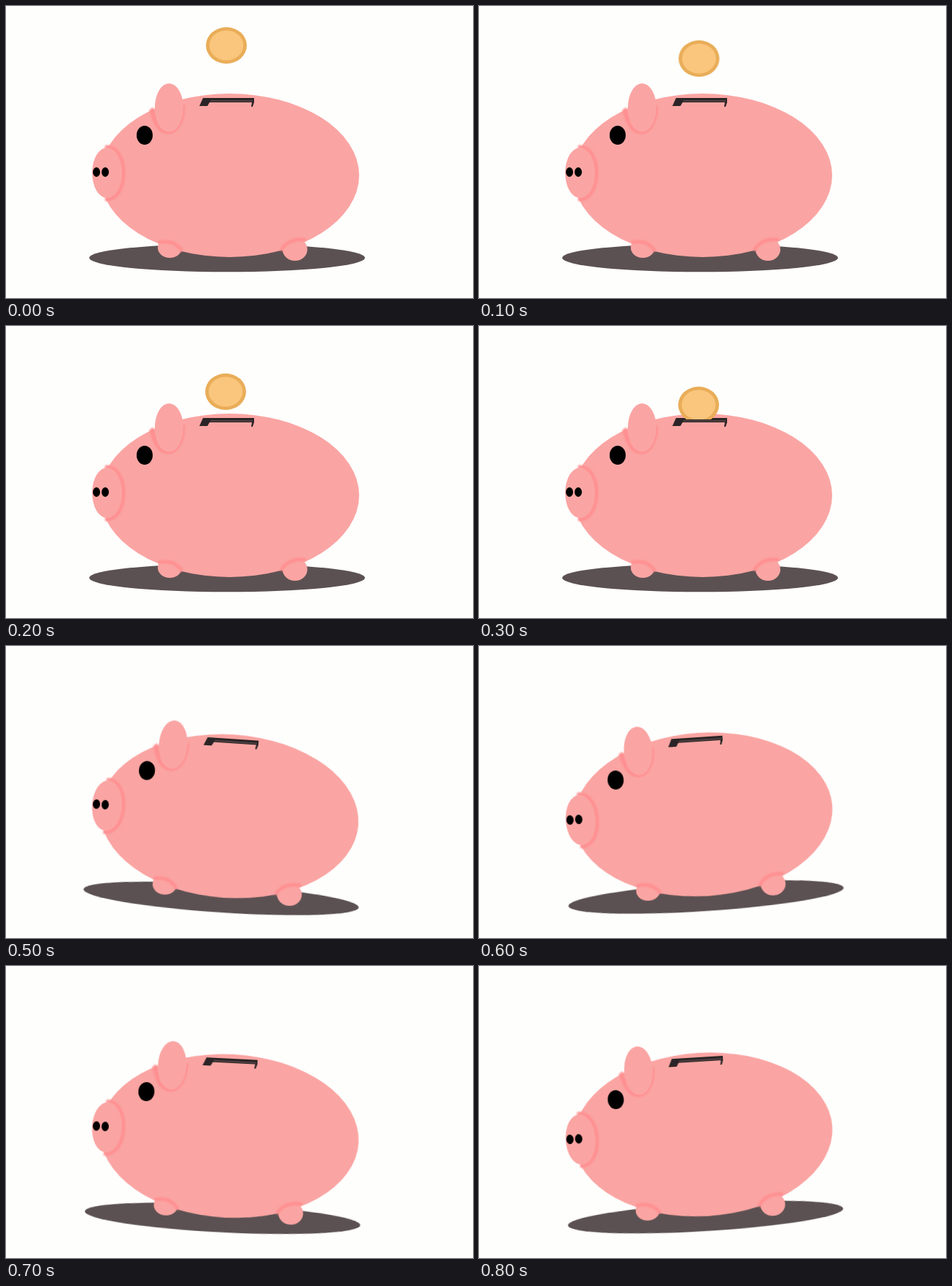
Animation, 640 px wide and 400 px high, one loop 1100 ms. Source, as an HTML page without scripts:

```html
<!DOCTYPE html>
<html lang="en">
<head>
<meta charset="utf-8">
<title>Piggy bank</title>
<style>
  html, body { margin: 0; width: 100%; height: 100%; overflow: hidden; background: #fefefd; }
  svg { display: block; width: 640px; height: 400px; }
  .skin { fill: #faa5a3; }
  .crease { fill: none; stroke: #ff9092; stroke-width: 5; stroke-linecap: round; }
  .coin { animation: drop 1.1s step-end infinite; }
  .pig { transform-origin: 288px 222px; animation: wobble 1.1s step-end infinite; }

  @keyframes drop {
    0% { transform: translate(302px, 54px); }
    9.09% { transform: translate(301.5px, 72px); }
    18.18% { transform: translate(301px, 90px); }
    27.27% { transform: translate(301px, 108px); }
    36.36%, 100% { transform: translate(301px, 108px); visibility: hidden; }
  }
  @keyframes wobble {
    0% { transform: none; }
    45.45% { transform: rotate(3.8deg); }
    54.54% { transform: rotate(-3.8deg); }
    63.63% { transform: rotate(2.9deg); }
    72.72%, 100% { transform: rotate(-3.5deg); }
  }
</style>
</head>
<body>
<svg viewBox="0 0 640 400">
  <defs>
    <filter id="soft" x="-30%" y="-30%" width="160%" height="160%">
      <feGaussianBlur stdDeviation="1"/>
    </filter>
    <clipPath id="aboveSlot"><path d="M0 0H640V128H0Z"/></clipPath>
  </defs>

  <g class="pig">
    <ellipse cx="303" cy="345" rx="189" ry="19.3" fill="#5c5152"/>
    <g class="skin">
      <ellipse cx="306.5" cy="232" rx="177.5" ry="112"/>
      <ellipse cx="224.5" cy="331" rx="16.5" ry="14"/>
      <ellipse cx="396" cy="333.5" rx="17" ry="15.5"/>
    </g>
    <g class="crease" filter="url(#soft)">
      <path d="M211 323.5Q230 320 240 334"/>
      <path d="M378 333Q388 318 409 320"/>
      <path d="M138 193C169 193 169 265 138 265"/>
      <path d="M201 142C202 182 242 186 243 138"/>
      <path d="M200 144L204 156" stroke-width="7"/>
    </g>
    <g class="skin">
      <ellipse cx="138.3" cy="228.5" rx="20.2" ry="34.5"/>
      <ellipse cx="223.5" cy="139.3" rx="19.5" ry="33.3"/>
    </g>
    <ellipse cx="190" cy="177" rx="11" ry="13"/>
    <ellipse cx="124" cy="227.5" rx="5" ry="6.5"/>
    <ellipse cx="136" cy="227.5" rx="5" ry="6.5"/>
    <path d="M270 126H340V132L338 138H336L337 132H279L276 137H265Z" fill="#2b2426"/>
    <path d="M280 130H338" stroke="#8a6a6a" stroke-width=".8"/>
  </g>

  <g clip-path="url(#aboveSlot)">
    <g class="coin">
      <ellipse rx="28" ry="25" fill="#e9ad58"/>
      <ellipse rx="23.3" ry="20.5" fill="#fac57c"/>
    </g>
  </g>
</svg>
</body>
</html>
```
